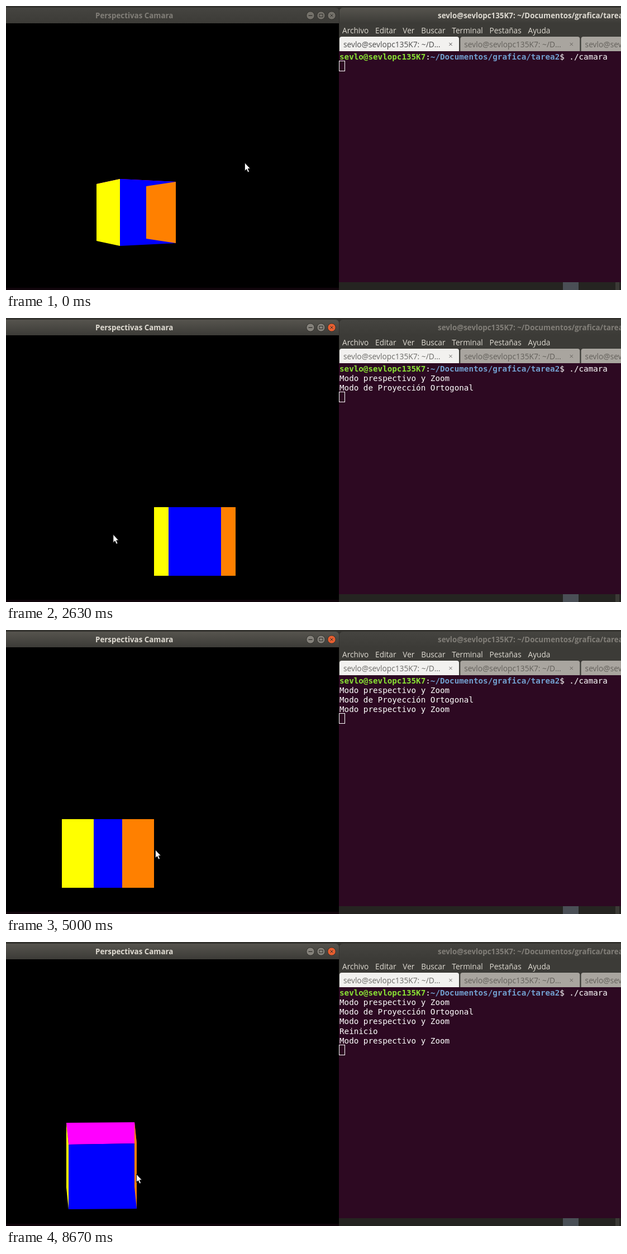
An HTML page with a canvas that plays this animation: 1101 by 509 pixels, repeating every 8.71 s.

```html
<!DOCTYPE html>
<html lang="es">
<head>
<meta charset="utf-8">
<title>Perspectivas Camara</title>
<style>
  html, body { margin: 0; overflow: hidden; background: #000; }
  canvas { display: block; }
</style>
</head>
<body>
<canvas id="stage" width="1101" height="509"></canvas>
<script>
const ctx = document.getElementById('stage').getContext('2d');
const LOOP = 8710, FOCUS = 650, ORTHO = 2600, RESET = 5500, REZOOM = 6480;
const UI = '"Open Sans", "Noto Sans", sans-serif';
const TITLE = `bold 13.35px ${UI}`, MENU = `13.65px ${UI}`;
const MONO = '14.24px "DejaVu Sans Mono", monospace';
const HOST = 'sevlo@sevlopc135K7', PATH = '~/Documentos/grafica/tarea2';
const CHAR = 8.57, ROW = 17.15;

const ZOOM_LINE = 'Modo prespectivo y Zoom';
const LOG = [
  [950, ZOOM_LINE], [ORTHO, 'Modo de Proyección Ortogonal'],
  [3690, ZOOM_LINE], [RESET, 'Reinicio'], [REZOOM, ZOOM_LINE],
];
// time, x, y
const POINTER = [
  [120, 427, 281], [950, 189, 388], [3900, 193, 388],
  [5000, 267, 394], [7170, 210, 416], [8130, 233, 416],
];
// time, degrees; a repeated time is a jump
const YAW = [
  [950, -25.6], [1400, -16], [1800, -12], [ORTHO, -20], [ORTHO, 12.4],
  [3900, 12.4], [4760, -43], [5050, -26.5], [RESET, -24], [RESET, 0],
  [REZOOM, 0], [6800, -22], [7170, 1.9], [7600, 15], [8130, -1.8],
];
// Colour, axis and side of each face, painted without depth test
const FACES = [['#f0f', 1, 1], ['#00f', 2, 1], ['#ff0', 0, -1], ['#ff8000', 0, 1]];
const SQUARE = [[-1, -1], [-1, 1], [1, 1], [1, -1]];

const rad = degrees => degrees * Math.PI / 180;

function ease(t, start, end) {
  const u = Math.min(1, Math.max(0, (t - start) / (end - start)));
  return u * u * (3 - 2 * u);
}

function sample(keys, t) {
  const next = keys.findIndex(([time]) => time > t);
  if (next < 0) return keys.at(-1).slice(1);
  const b = keys[next], a = keys[next - 1] ?? b;
  const k = a === b ? 0 : ease(t, a[0], b[0]);
  return a.slice(1).map((v, i) => v + (b[i + 1] - v) * k);
}

function rect(color, x, y, w, h, radii = 0) {
  ctx.fillStyle = color;
  ctx.beginPath();
  ctx.roundRect(x, y, w, h, radii);
  ctx.fill();
}

// Returns the width of the written text
function text(str, x, y, color, font) {
  ctx.font = font;
  ctx.fillStyle = color;
  ctx.fillText(str, x, y);
  return ctx.measureText(str).width;
}

function poly(points, fill, stroke) {
  ctx.beginPath();
  points.forEach(p => ctx.lineTo(...p));
  ctx.closePath();
  ctx.fillStyle = fill;
  ctx.fill();
  if (stroke) {
    ctx.strokeStyle = stroke;
    ctx.stroke();
  }
}

function cross(x, y, r, color) {
  ctx.strokeStyle = color;
  ctx.beginPath();
  for (const d of [-r, r]) {
    ctx.moveTo(x - r, y - d);
    ctx.lineTo(x + r, y + d);
  }
  ctx.stroke();
}

function titleBar(label, textX, x, w, radii, focused) {
  const shade = ctx.createLinearGradient(0, 3, 0, 31);
  shade.addColorStop(0, focused ? '#56544e' : '#454440');
  shade.addColorStop(1, '#3c3b37');
  rect(shade, x, 3, w, 28, radii);
  text(label, textX, 22, focused ? '#dfdbd2' : '#817e78', TITLE);
}

function button(x, color) {
  ctx.beginPath();
  ctx.arc(x, 17, 7.2, 0, 7);
  ctx.fillStyle = color;
  ctx.fill();
  ctx.strokeStyle = '#32312d';
  ctx.stroke();
}

function cube(t) {
  const [degrees] = sample(YAW, t);
  const yaw = rad(degrees), pitch = t < RESET ? 0 : rad(18.5);
  const s = Math.sin(yaw), c = Math.cos(yaw);
  const base = t < RESET ? 290 : 169 + 9 * ease(t, REZOOM, 7170);
  const turn = degrees + 25.6;

  const project = ([px, py, pz]) => {
    const x = (px * c - pz * s) / 2, y = py / 2, z = (px * s + pz * c) / 2;
    if (t < ORTHO) {
      const k = 600 / (5.7 - .035 * turn - z);
      return [215.5 + k * (.14 + .108 * turn + x), 370 - k * y];
    }
    const up = y * Math.cos(pitch) - z * Math.sin(pitch);
    return [base + 3.87 * degrees + 122.6 * x, 400.7 - 122.6 * up];
  };

  for (const [color, axis, side] of FACES) {
    poly(SQUARE.map(([a, b]) => {
      const corner = [a, b];
      corner.splice(axis, 0, side);
      return project(corner).map(Math.round);
    }), color);
  }
}

function viewer(t, focused) {
  titleBar('Perspectivas Camara', 160, -6, 602, [0, 6, 0, 0], focused);
  const gray = focused ? '#85827b' : '#75726b';
  button(545, gray);
  button(564, gray);
  button(583, focused ? '#e95f30' : gray);
  ctx.strokeRect(542, 17, 6, .4);
  ctx.strokeRect(561, 14.5, 6, 5);
  cross(583, 17, 2.5, '#32312d');
  rect('#000', 0, 31, 596, 474);
  cube(t);
}

function tab(index, focused) {
  const x = 597 + 216.3 * index;
  rect(index ? '#a9a59f' : '#f2f1ef', x, 55, 214, 26, [4, 4, 0, 0]);
  const color = index ? '#63605b' : focused ? '#4c4c4c' : '#6c6b68';
  text(`${HOST}: ~/D…`, x + 7, 74, color, `13.75px ${UI}`);
  cross(x + 199, 68.5, 2.6, color);
}

function terminal(t, focused) {
  titleBar(`${HOST}: ${PATH}`, 773, 597, 510, [6, 0, 0, 0], focused);
  rect('#3c3b37', 597, 31, 504, 50);
  let x = 602;
  for (const label of ['Archivo', 'Editar', 'Ver', 'Buscar', 'Terminal', 'Pestañas', 'Ayuda']) {
    x += text(label, x, 49, '#dfdbd2', MENU) + 11.8;
  }
  for (let i = 0; i < 3; i++) tab(i, focused);

  rect('#2d0922', 596, 81, 505, 414);
  const write = (str, col, row, color = '#fff', weight = '') =>
    text(str, 597 + col * CHAR, 96 + row * ROW, color, weight + MONO);
  const pathCol = HOST.length + 1;
  write(HOST, 0, 0, '#8ae234', 'bold ');
  write(':', HOST.length, 0);
  write(PATH, pathCol, 0, '#729fcf', 'bold ');
  write('$ ./camara', pathCol + PATH.length, 0);

  const lines = LOG.filter(([time]) => t >= time);
  lines.forEach(([, str], i) => write(str, 0, i + 1));
  ctx.strokeStyle = '#fff';
  ctx.strokeRect(596.5, Math.round(98 + ROW * lines.length) + .5, 10, 18);
}

function desktop() {
  rect('#33322e', 0, 0, 1101, 509);
  rect('#10050b', 0, 505, 596, 4);
  rect('#252421', 596, 495, 505, 14);
  rect('#4a4f56', 997, 495, 28, 14);
  rect('#3b3a36', 1091, 495, 7, 14);
}

function pointer(t) {
  const [x, y] = sample(POINTER, t);
  const arrow = [[0, 0], [0, 14.5], [3.2, 11.6], [5.5, 17], [8, 16], [5.7, 10.7], [9.5, 10.2]];
  poly(arrow.map(([dx, dy]) => [x + dx + .5, y + dy]), '#fff', '#222');
}

function frame(now) {
  const t = now % LOOP;
  desktop();
  viewer(t, t >= FOCUS);
  terminal(t, t < FOCUS);
  pointer(t);
  requestAnimationFrame(frame);
}
requestAnimationFrame(frame);
</script>
</body>
</html>
```
